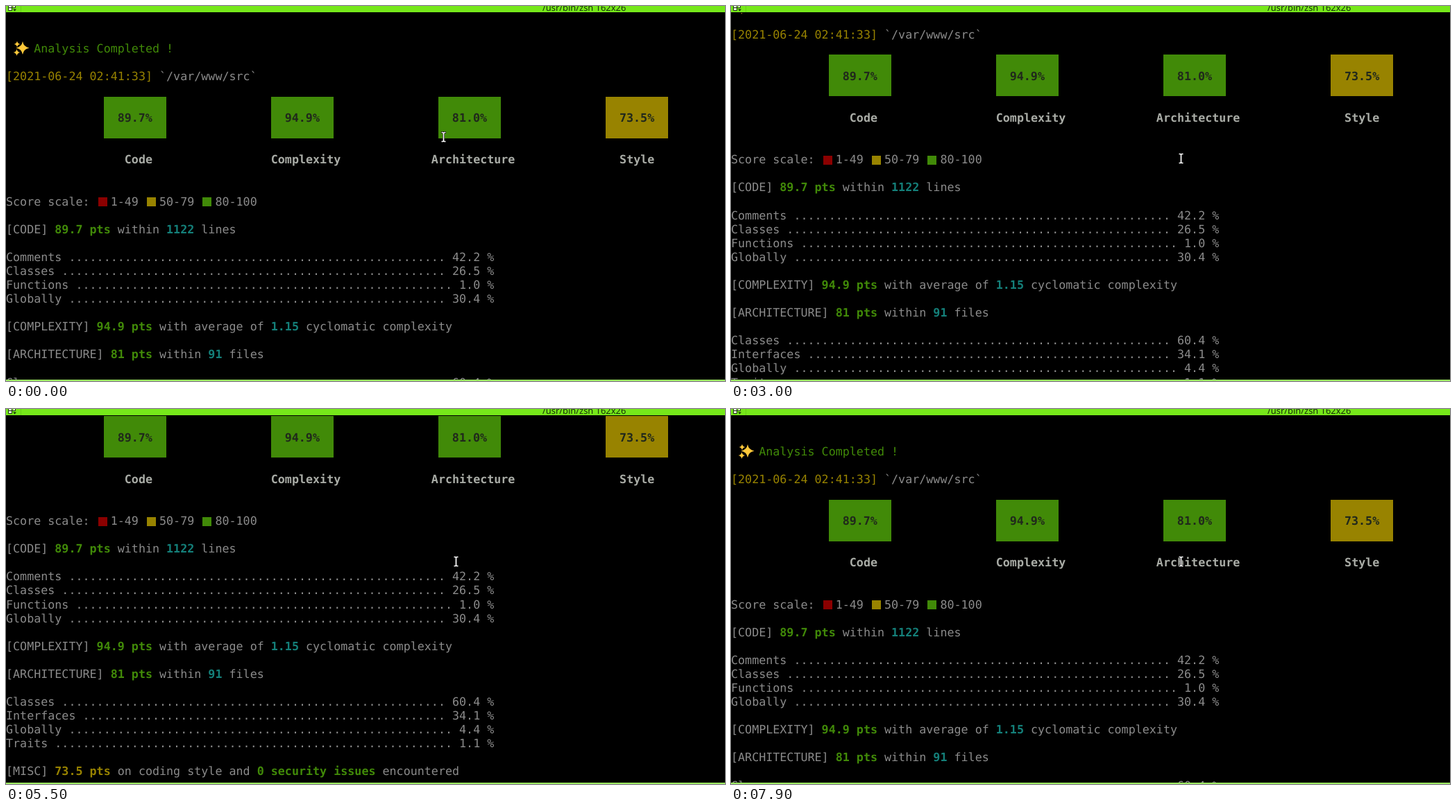
Write an HTML page that moves like this. It is 1036x541 px and loops after 8 s.

```html
<!DOCTYPE html>
<html lang="en">
<head>
<meta charset="utf-8">
<title>Code analysis in a terminal</title>
<style>
  :root { --row: 20.08px; --green: #418a08; --gold: #988300; --red: #8b0000; --cyan: #14807a; --bar: #76e81a; }
  html, body { margin: 0; width: 100%; height: 100%; overflow: hidden; background: #000; }
  #stage { position: relative; width: 1036px; height: 541px; overflow: hidden; background: #000; }
  #stage div, #stage pre, #stage svg { position: absolute; }
  #title { left: 0; top: 0; width: 1036px; height: 9px; overflow: hidden; background: var(--bar); }
  #title span { position: absolute; left: 773px; top: -7px; font: 12.9px/18px "Noto Sans", sans-serif; color: #17300a; white-space: pre; text-rendering: geometricPrecision; }
  #foot { left: 0; top: 539px; width: 1036px; height: 2px; background: #9be861; }
  #view { left: 0; top: 10px; width: 1036px; height: 529px; overflow: hidden; }
  #page { left: 0; top: 0; width: 1036px; }
  pre, .score b { font: 16.69px/var(--row) "DejaVu Sans Mono", monospace; text-rendering: geometricPrecision; }
  pre { left: 0; top: 1.5px; margin: 0; color: #8b8b8b; }
  b { color: #a9aca6; }
  .green { color: var(--green); }
  .gold { color: var(--gold); }
  .red { color: var(--red); }
  .cyan { color: var(--cyan); }
  .score { top: 120.7px; width: 90.4px; height: 60px; }
  .score b { position: absolute; left: 20px; top: 21.3px; color: #20281c; font-weight: bold; }
  .swatch { top: 266.3px; width: 13px; height: 13px; }
</style>
</head>
<body>
<div id="stage">
  <div id="view"><div id="page">
    <pre id="text"></pre>
    <svg id="sparkles" width="40" height="80" style="left:0;top:0" fill="#fdc83a"></svg>
  </div></div>
  <div id="title">
    <svg width="24" height="9" style="left:0;top:0">
      <path d="M3.5-1V2.5H8.5V-1M8.5 2.5H13.5V-1M3.5 2.5V6.5H8.5V2.5" fill="#e9f5df" stroke="#17300a"/>
      <path d="M10 4.5H15L12.5 7.5Z" fill="#17300a"/>
      <path d="M21.5 0V9" stroke="#68d016"/>
    </svg>
    <span>/usr/bin/zsh 162x26</span>
  </div>
  <div id="foot"></div>
  <svg id="cursor" width="9" height="18">
    <path d="M1 2.5H3.5L4.5 3.5L5.5 2.5H8M4.5 3.5V14.5M1 15.5H3.5L4.5 14.5L5.5 15.5H8" fill="none" stroke="#000" stroke-width="3"/>
    <path d="M1.5 2.5H3.5L4.5 3.5L5.5 2.5H7.5M4.5 3.5V14.5M1.5 15.5H3.5L4.5 14.5L5.5 15.5H7.5" fill="none" stroke="#fff" stroke-width="1.7"/>
  </svg>
</div>
<script>
const COL = 10.046, ROW = 20.08, LOOP = 8000;
const $ = id => document.getElementById(id);
const page = $('page');

const tint = (color, text) => `<span class="${color}">${text}</span>`;
const strong = (color, text) => `<b class="${color}">${text}</b>`;
// Dotted leader filling the row to 70 columns
const share = (name, value) =>
  `${name} ${'.'.repeat(66 - name.length - value.length)} ${value} %`;

const labels = [[17, 'Code'], [38, 'Complexity'], [61, 'Architecture'], [88, 'Style']]
  .reduce((line, [col, name]) => line.padEnd(col) + name, '');

$('text').innerHTML = [
  '', '',
  '    ' + tint('green', 'Analysis Completed !'),
  '',
  tint('gold', '[2021-06-24 02:41:33]') + ' `/var/www/src`',
  '', '', '', '', '',
  `<b>${labels}</b>`,
  '', '',
  'Score scale:   1-49   50-79   80-100',
  '',
  `[CODE] ${strong('green', '89.7 pts')} within ${strong('cyan', '1122')} lines`,
  '',
  share('Comments', '42.2'),
  share('Classes', '26.5'),
  share('Functions', '1.0'),
  share('Globally', '30.4'),
  '',
  `[COMPLEXITY] ${strong('green', '94.9 pts')} with average of ${strong('cyan', '1.15')} cyclomatic complexity`,
  '',
  `[ARCHITECTURE] ${strong('green', '81 pts')} within ${strong('cyan', '91')} files`,
  '',
  share('Classes', '60.4'),
  share('Interfaces', '34.1'),
  share('Globally', '4.4'),
  share('Traits', '1.1'),
  '',
  `[MISC] ${strong('gold', '73.5 pts')} on coding style and ${strong('green', '0 security issues')} encountered`,
  '',
  `${tint('red', '•')} [Code] <b>Forbidden public property</b>:`,
  `  ${tint('cyan', 'app/Models/CRM/Client/ShopkeeperModel.php:17')}: Do not use public properties. Use method access instead`,
  `  ${tint('cyan', 'app/Models/Financial/BankAccount/BankAccountModel.php:17')}: Do not use public properties. Use method`
].join('\n');

function addBlock(kind, x, color, content = '') {
  page.insertAdjacentHTML('beforeend',
    `<div class="${kind}" style="left:${x}px;background:var(--${color})">${content}</div>`);
}
['89.7%', '94.9%', '81.0%', '73.5%'].forEach((score, i) =>
  addBlock('score', (14 + 24 * i) * COL, i < 3 ? 'green' : 'gold', `<b>${score}</b>`));
[[13, 'red'], [20, 'gold'], [28, 'green']].forEach(([col, color]) =>
  addBlock('swatch', col * COL + 2, color));

const star = (x, y, r) => `<path d="M${x} ${y - r}Q${x + r * .15} ${y - r * .15} ${x + r} ${y}` +
  `Q${x + r * .15} ${y + r * .15} ${x} ${y + r}Q${x - r * .15} ${y + r * .15} ${x - r} ${y}` +
  `Q${x - r * .15} ${y - r * .15} ${x} ${y - r}Z"/>`;
$('sparkles').innerHTML = star(24, 50.5, 9.5) + star(16, 45, 4.5) + star(15.5, 57, 5);

// [start ms, rows scrolled]
const scrolls = [[0, 0], [3000, 3], [3300, 6], [3700, 9], [5500, 6], [7000, 3], [7900, 0]];
// [start ms, centre x, centre y]
const pointer = [[0, 630.5, 189], [1100, 648.5, 219], [1300, 648.5, 220]];
const at = (steps, t) => steps.findLast(([start]) => t >= start);

function draw(now) {
  const t = now % LOOP;
  const [, rows] = at(scrolls, t);
  const [, x, y] = at(pointer, t);
  page.style.top = -rows * ROW + 'px';
  $('cursor').style.left = x - 4.5 + 'px';
  $('cursor').style.top = y - 9 + 'px';
}
function tick() {
  draw(performance.now());
  requestAnimationFrame(tick);
}
tick();
</script>
</body>
</html>
```
